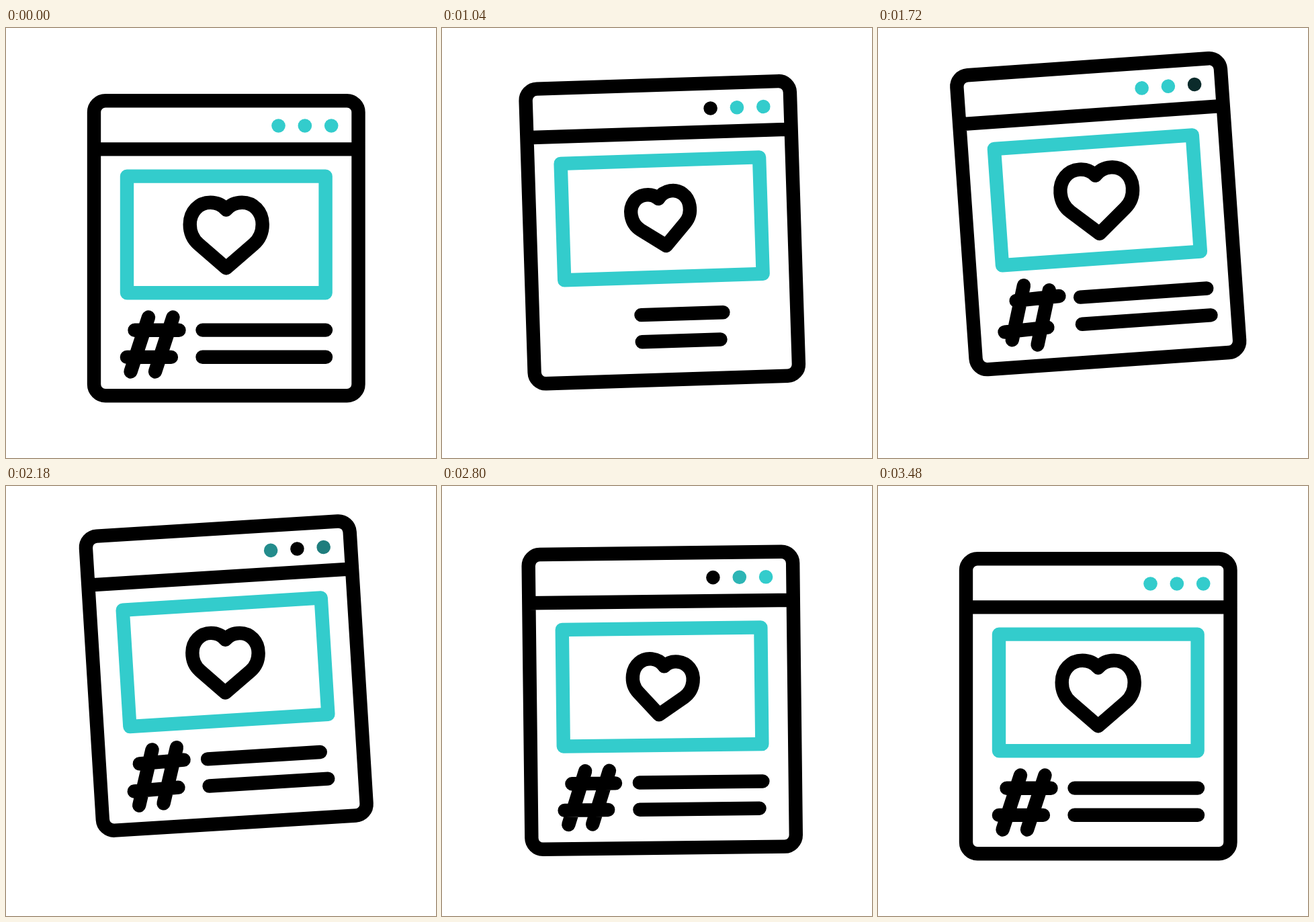
An HTML page with a canvas that plays this animation: 640 px wide and 640 px high, repeating every 3.6 s.

```html
<!DOCTYPE html>
<html lang="en">
<head>
<meta charset="utf-8">
<title>Hashtag page</title>
<style>
  html, body { margin: 0; width: 100%; height: 100%; overflow: hidden; background: #fff; }
  canvas { display: block; width: 640px; height: 640px; }
</style>
</head>
<body>
<canvas id="stage" width="640" height="640"></canvas>
<script>
const LOOP = 3600, START = 120, PEAK = 1780, HALF = PEAK - START;
const INK = '#000', TEAL = [51, 204, 204];
const DOT_CYCLE = 840, DOT_CYCLES = 4, LINE_DELAY = 270;
const ctx = document.getElementById('stage').getContext('2d');

const clamp = x => Math.min(1, Math.max(0, x));
const smooth = u => u * u * (3 - 2 * u);

// Eased value through a few [time, value] points.
function track(t, ...points) {
  let [t0, value] = points[0];
  for (const [t1, next] of points.slice(1)) {
    value += (next - value) * smooth(clamp((t - t0) / (t1 - t0)));
    if (t < t1) break;
    t0 = t1;
  }
  return value;
}

// Cubic bezier easing with handles (x1, 0) and (x2, 1).
function bezier(x, x1, x2) {
  let lo = 0, hi = 1;
  for (let i = 0; i < 24; i++) {
    const v = (lo + hi) / 2, w = 1 - v;
    if (3 * w * w * v * x1 + 3 * w * v * v * x2 + v * v * v < x) lo = v; else hi = v;
  }
  return smooth(lo);
}

function place(x, y, turn, draw) {
  ctx.save();
  ctx.translate(x, y);
  ctx.rotate(turn * Math.PI / 180);
  draw();
  ctx.restore();
}

function stroke(color, build) {
  ctx.strokeStyle = color;
  ctx.beginPath();
  build();
  ctx.stroke();
}

function segment(x0, y0, x1, y1) {
  ctx.moveTo(x0, y0);
  ctx.lineTo(x1, y1);
}

// Two beats, leaning left and then right; the stroke keeps its weight.
function drawHeart(t) {
  const u = clamp((t - START) / (2 * HALF)) * 2;
  const beat = Math.sin(Math.PI * u) ** 2, size = 1 - .19 * beat;
  place(327.7, 307.3, (u < 1 ? -7.8 : 7.8) * beat, () => stroke(INK, () => {
    for (const side of [size, -size]) {
      const curve = (a, b, c, d, e, f) =>
        ctx.bezierCurveTo(a * side, b * size, c * side, d * size, e * side, f * size);
      ctx.moveTo(0, -36.8 * size);
      curve(-6, -44, -14, -47.5, -23.5, -47.5);
      curve(-40.5, -47.5, -54, -34, -54, -15);
      curve(-54, -2, -48.5, 8, -41, 14.5);
      ctx.lineTo(0, 50 * size);
    }
  }));
}

// The strokes shrink towards their outer ends while the sign turns, then grow back.
function drawHash(t) {
  const turn = track(t, [120, 0], [640, 29], [1120, 29], [1700, -2.1], [3000, 0]);
  const length = track(t, [120, 1], [640, 0], [1120, 0], [1890, 1]);
  const size = track(t, [120, 1], [1720, 1.11], [2440, .955], [3120, 1]);
  if (length < .005) return;
  const bar = (x, y, dx, dy) =>
    segment(x * size, y * size, (x + dx * length) * size, (y + dy * length) * size);
  place(217, 470.6, turn, () => stroke(INK, () => {
    for (const s of [1, -1]) {
      bar(1.7 + 38.8 * s, -.8 - 20.1 * s, -66 * s, 0);
      bar(-5 * s, .4 - 40.5 * s, -26.5 * s, 81 * s);
    }
  }));
}

function drawLine(t, y) {
  const length = track(t, [160, 183.5], [900, 111], [1520, 195], [2160, 168], [2770, 183.5]);
  stroke(INK, () => segment(292.5, y, 292.5 + length, y));
}

// A dark wave passes over the dots from left to right.
function drawDots(t) {
  const time = t - START, phase = time % DOT_CYCLE;
  const active = time >= 0 && time < DOT_CYCLES * DOT_CYCLE;
  for (let i = 0; i < 3; i++) {
    const rise = (phase - 142 * i) / (80 + 85 * i);
    const fall = (460 + 190 * i - phase) / (250 - 75 * i);
    const light = active ? 1 - clamp(Math.min(rise, fall)) : 1;
    ctx.fillStyle = `rgb(${TEAL.map(c => Math.round(c * light))})`;
    ctx.beginPath();
    ctx.arc(405.5 + 39.35 * i, 145.5, 10.3, 0, 2 * Math.PI);
    ctx.fill();
  }
}

function drawPage(t) {
  stroke(INK, () => {
    ctx.roundRect(131, 108.3, 393.5, 438.9, 17);
    segment(131, 180.4, 524.5, 180.4);
  });
  drawDots(t);
  stroke(`rgb(${TEAL})`, () => ctx.rect(180, 220.6, 295.6, 173.6));
  drawHeart(t);
  drawHash(t);
  drawLine(t, 449.6);
  drawLine(t - LINE_DELAY, 489.8);
}

function render(t) {
  const lift = bezier(clamp(1 - Math.abs(t - PEAK) / HALF), .69, .5);
  ctx.fillStyle = '#fff';
  ctx.fillRect(0, 0, 640, 640);
  ctx.lineWidth = 20.4;
  ctx.lineCap = ctx.lineJoin = 'round';
  place(327.7, 327.7 - 51.2 * lift, -4 * lift, () => {
    ctx.translate(-327.7, -327.7);
    drawPage(t);
  });
}

const begin = performance.now();
function tick() {
  render((performance.now() - begin) % LOOP);
  requestAnimationFrame(tick);
}
tick();
</script>
</body>
</html>
```
